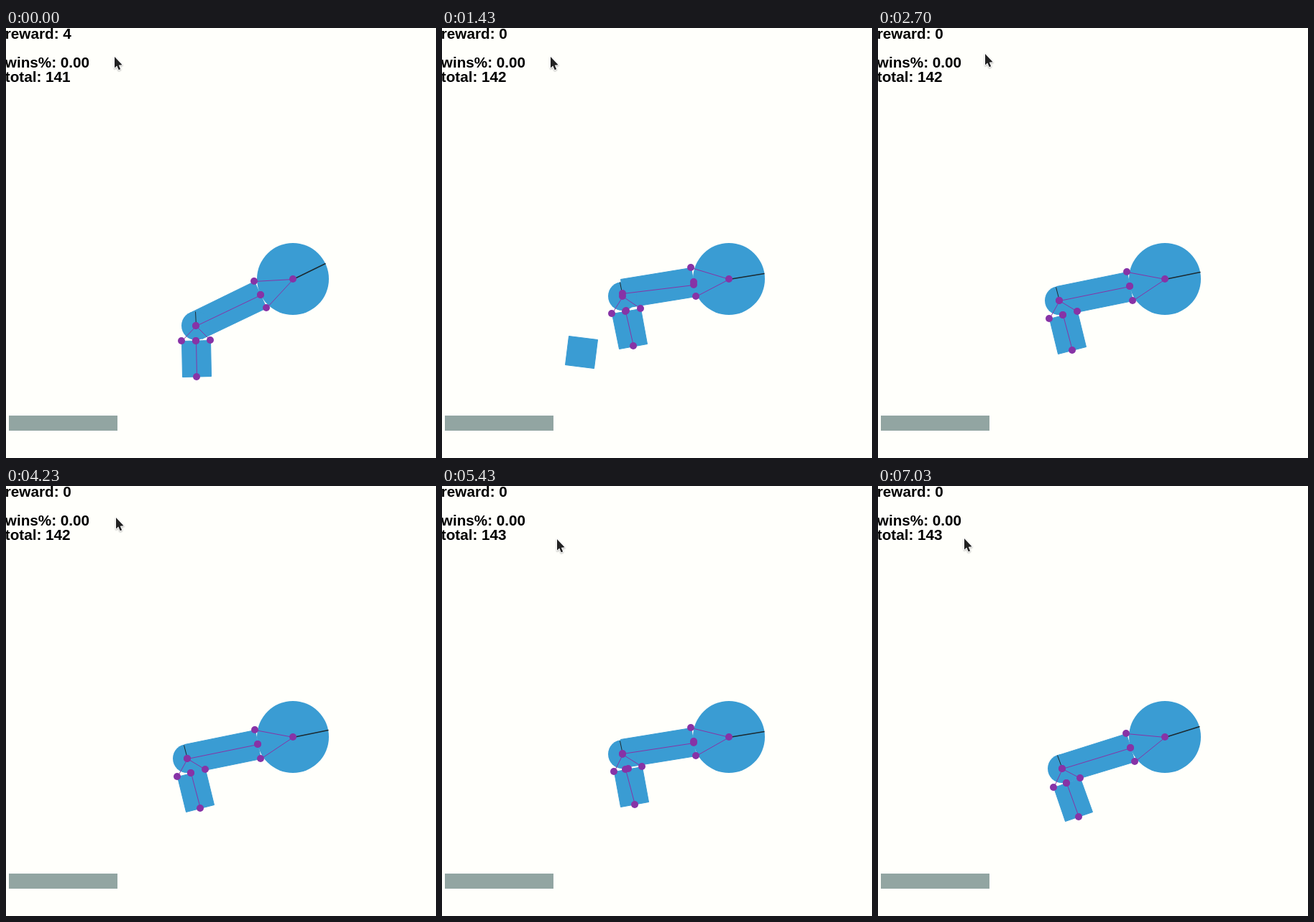
Write an HTML page with a canvas that moves like this. It is 598x598 px and loops after 8 s.

```html
<!DOCTYPE html>
<html lang="en">
<head>
<meta charset="utf-8">
<title>Robot arm</title>
<style>
html, body { margin: 0; width: 100%; height: 100%; overflow: hidden; background: #fffffb; }
canvas { display: block; }
</style>
</head>
<body>
<canvas id="stage" width="598" height="598"></canvas>
<script>
const ctx = document.getElementById('stage').getContext('2d');
const LOOP = 8000, BLUE = '#3a9cd3', PURPLE = '#8733a6', DARK = '#1c2a31';
const HUB = [399, 349], RADIUS = 50, LENGTH = 100, HALF = 20;
const THROWS = [570, 4330];
const linear = k => k;
const smooth = k => k * k * (3 - 2 * k);

// Arm moves: start, end, [upper angle, lower angle, lift off the wheel, wrist slide]
const armMoves = [
  [0, 0, [25.5, 1.3, 0, 0]],
  [THROWS[0], 1430, [9.2, 11.2, 4, 1]],
  [1430, 2330, [11.5, 14.4, 0, 0]],
  [THROWS[1], 5030, [5, 7.3, 1, 7]],
  [5030, 5900, [14.5, 14.3, 2.5, 0], linear],
  [5900, 6130, [17, 19.2, 0, 0], linear]
];
// Pointer moves: start, end, [x, y]
const pointerMoves = [
  [0, 0, [151, 41]],
  [2700, 2700, [149, 37]],
  [4230, 4230, [153, 45]],
  [THROWS[1], 5030, [178, 72]],
  [5070, 5870, [136, 79]],
  [6530, 7030, [120, 74]]
];

function follow(moves, t) {
  let now = moves[0][2];
  for (const [start, end, goal, ease = smooth] of moves) {
    if (t < start) break;
    const k = t >= end ? 1 : ease((t - start) / (end - start));
    now = now.map((v, i) => v + (goal[i] - v) * k);
  }
  return now;
}

const snap = p => p.map(Math.round);

// Point at a local offset from p, in axes turned anticlockwise
function at([px, py], deg, x, y) {
  const a = deg * Math.PI / 180, c = Math.cos(a), s = Math.sin(a);
  return [px + x * c + y * s, py - x * s + y * c];
}

function disc(p, r, color) {
  ctx.fillStyle = color;
  ctx.beginPath();
  ctx.arc(...snap(p), r, 0, 2 * Math.PI);
  ctx.fill();
}

// Lines and boxes run through pixel centres
function trace(points, color, width) {
  ctx.strokeStyle = color;
  ctx.lineWidth = width;
  ctx.beginPath();
  points.forEach(p => ctx.lineTo(...snap(p).map(v => v + 0.5)));
}

function line(a, b, color, width = 1) {
  trace([a, b], color, width);
  ctx.stroke();
}

function box(p, deg, x, y, w, h) {
  const corners = [[x, y], [x + w, y], [x + w, y + h], [x, y + h]];
  trace(corners.map(c => at(p, deg, ...c)), BLUE, 1);
  ctx.closePath();
  ctx.fillStyle = BLUE;
  ctx.fill();
  ctx.stroke();
}

function drawArm([upper, lower, lift, slide]) {
  const rim = at(HUB, upper, -RADIUS, 0);
  const elbow = at(HUB, upper, -RADIUS - LENGTH, 0);
  const end = [rim[0], rim[1] - lift];
  const far = at(end, upper, -LENGTH, 0);
  const joint = at(elbow, lower, 0, HALF + 1);
  const top = at(joint, lower, slide, 0);
  const hand = at(top, lower, 0, 50);
  const shoulders = [at(end, upper, 0, -HALF), at(end, upper, 0, HALF)];
  const wrists = [at(top, lower, -HALF, 0), at(top, lower, HALF, 0)];

  disc(HUB, RADIUS, BLUE);
  box(end, upper, -LENGTH, -HALF, LENGTH, 2 * HALF);
  disc(elbow, HALF, BLUE);
  box(top, lower, -HALF, 0, 2 * HALF, 50);
  line(HUB, at(HUB, upper, RADIUS, 0), DARK, 1.6);
  line(elbow, at(elbow, lower, 0, -HALF), DARK);

  shoulders.forEach(p => line(HUB, p, PURPLE));
  wrists.forEach(p => line(elbow, p, PURPLE));
  line(far, rim, PURPLE);
  line(joint, hand, PURPLE);
  [HUB, ...shoulders, ...wrists, rim, end, far, elbow, joint, top, hand]
    .forEach(p => disc(p, 5, PURPLE));
}

// The first block is nudged by the arm, the second falls straight
function drawBlock(t, i) {
  const s = (t - THROWS[i] - (i ? 0 : 73)) / 1000, nudge = i ? 0 : s;
  if (s < 0 || s > 1.2) return;
  box([191 + 3.5 * nudge, 171 + 450 * s * s], -9 * nudge, -HALF, -HALF, 2 * HALF, 2 * HALF);
}

function drawText(t) {
  const thrown = THROWS.filter(start => t >= start).length;
  ctx.fillStyle = '#000';
  ctx.font = 'bold 20.7px "Liberation Sans", Arial, sans-serif';
  ctx.fillText('reward: ' + (thrown ? 0 : 4), -1.2, 15);
  ctx.fillText('wins%: 0.00', -1.2, 55);
  ctx.fillText('total: ' + (141 + thrown), -1.2, 75);
}

function drawPointer(p) {
  ctx.save();
  ctx.translate(...snap(p));
  ctx.beginPath();
  [[0, -1], [0, 14.5], [3.3, 11.6], [5.7, 17.3], [8.2, 16.2], [5.8, 10.7], [10.6, 10.2]]
    .forEach(q => ctx.lineTo(...q));
  ctx.closePath();
  ctx.lineJoin = 'round';
  ctx.shadowColor = 'rgba(0,0,0,.3)';
  ctx.shadowBlur = 2;
  ctx.shadowOffsetY = 1;
  ctx.strokeStyle = '#fff';
  ctx.lineWidth = 2;
  ctx.stroke();
  ctx.shadowColor = 'transparent';
  ctx.fillStyle = '#222';
  ctx.fill();
  ctx.restore();
}

function draw(t) {
  ctx.fillStyle = '#fffffb';
  ctx.fillRect(0, 0, 598, 598);
  ctx.fillStyle = '#92a5a2';
  ctx.fillRect(4, 539, 151, 21);
  THROWS.forEach((_, i) => drawBlock(t, i));
  drawArm(follow(armMoves, t));
  drawText(t);
  drawPointer(follow(pointerMoves, t));
}

const begun = performance.now();
function tick() {
  draw((performance.now() - begun) % LOOP);
  requestAnimationFrame(tick);
}
tick();
</script>
</body>
</html>
```
